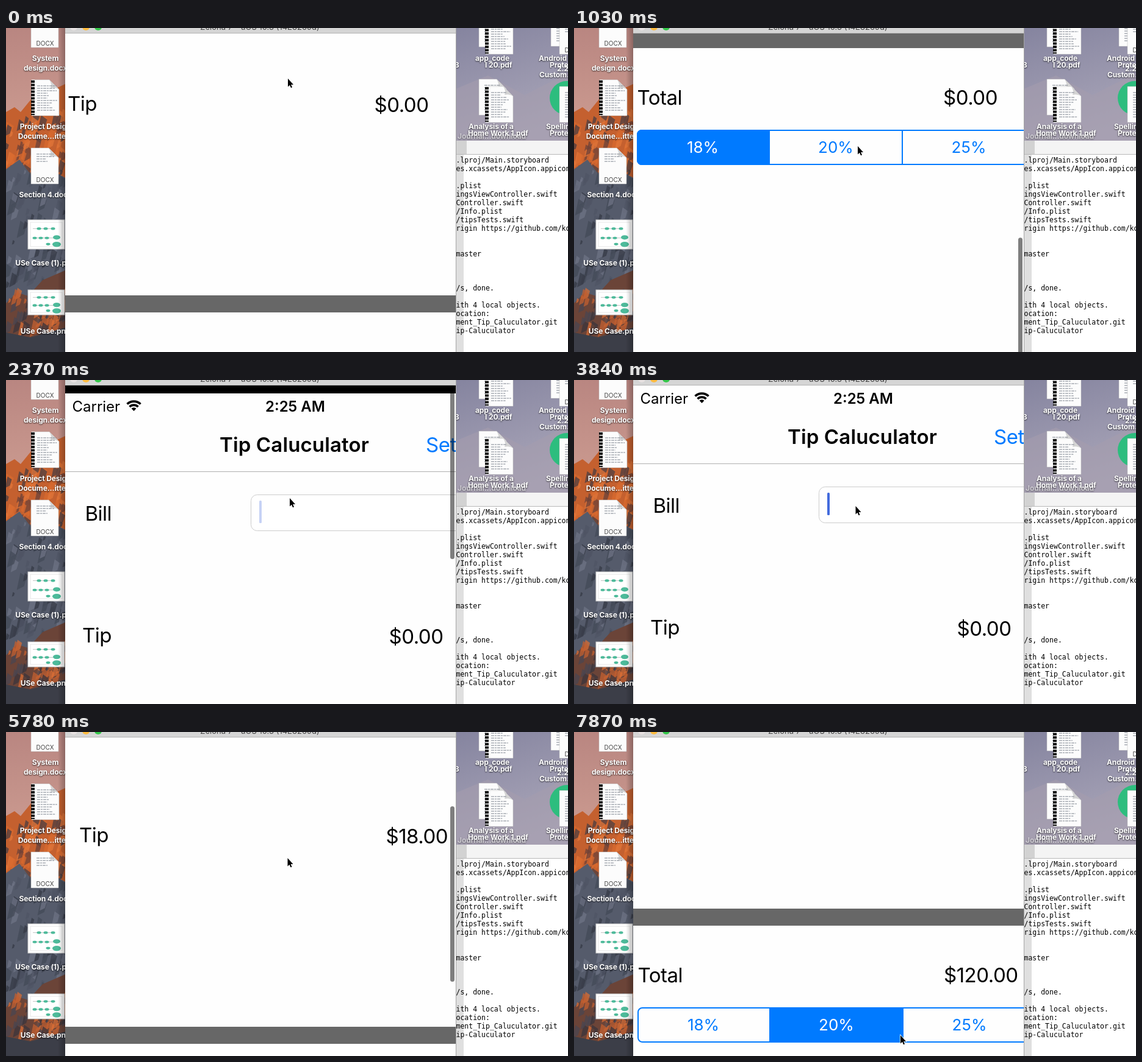
Animation of 921 by 532 pixels, one loop 8000 ms. Source, as an HTML page:

```html
<!DOCTYPE html>
<html lang="en">
<head>
<meta charset="utf-8">
<title>Tip calculator demo</title>
<style>
html, body { margin: 0; width: 100%; height: 100%; overflow: hidden; }
svg { display: block; width: 921px; height: 532px; }
text { font-family: Inter, "Open Sans", sans-serif; white-space: pre; }
.big { font-size: 33px; letter-spacing: -.015em; }
.semi { font-weight: 600; }
.mid { text-anchor: middle; }
.title { letter-spacing: .004em; }
.status { font-size: 24px; }
.field, .seg { font-size: 26px; }
.label { font-size: 12px; font-weight: 700; letter-spacing: -.01em; fill: #fff; }
.labels { filter: drop-shadow(0 1px 1px rgba(0, 0, 0, .75)); }
.term { font: 11.5px "DejaVu Sans Mono", monospace; }
</style>
</head>
<body>
<svg viewBox="0 0 921 532">
  <defs>
    <linearGradient id="sky" x2="0" y2="1">
      <stop stop-color="#b98681"/><stop offset="1" stop-color="#cf9f93"/>
    </linearGradient>
    <linearGradient id="dusk" x2=".3" y2="1">
      <stop stop-color="#85849f"/><stop offset="1" stop-color="#aaa6b9"/>
    </linearGradient>
    <linearGradient id="shade">
      <stop stop-opacity="0"/><stop offset="1" stop-opacity=".25"/>
    </linearGradient>
    <clipPath id="left"><path d="M0 0H97V532H0z"/></clipPath>
    <clipPath id="screen"><path d="M97 9H737V532H97z"/></clipPath>
    <clipPath id="pill"><rect x="129" y="883" width="654" height="58" rx="8"/></clipPath>
  </defs>
  <g id="desktop"></g>
  <g id="terminal"></g>
  <g id="window">
    <path d="M97 0H737V9H97z" fill="#d5d5d5"/>
    <path d="M97 8.5H737" stroke="#b5b5b5"/>
    <circle cx="111" cy="-2" r="6" fill="#e8e2e2"/>
    <circle cx="131" cy="-2" r="6" fill="#fdbc40"/>
    <circle cx="151" cy="-2" r="6" fill="#34c84a"/>
    <text class="mid" x="416" y="3" font-size="13" fill="#444">Zelona 7 – uOS 10.3 (14E8269d)</text>
    <g clip-path="url(#screen)">
      <path d="M97 9H737V532H97z"/>
      <g id="page">
        <path d="M0 9H900V1400H0z" fill="#fefefe"/>
        <text class="status" x="108.5" y="38.5">Carrier</text>
        <g fill="none" stroke="#000" stroke-width="3.6">
          <path d="M198.5 26.5a16 16 0 0 1 22 0M202.5 31a10 10 0 0 1 14 0"/>
          <path d="M209.5 38l-4-4.3a6 6 0 0 1 8 0z" fill="#000" stroke="none"/>
        </g>
        <text class="status semi mid" x="474" y="38.5">2:25 AM</text>
        <text class="big semi mid title" x="472.5" y="105">Tip Caluculator</text>
        <text class="big" x="688" y="105" fill="#007aff">Settings</text>
        <path d="M0 137.5H900" stroke="#b0b0b0"/>
        <text class="big" x="129.5" y="218">Bill</text>
        <rect x="401.5" y="175.5" width="400" height="59" rx="10" fill="#fff" stroke="#ccc"/>
        <text class="field" id="bill" x="414" y="213"></text>
        <rect id="caret" y="185" width="4" height="37" rx="1.5" fill="#426bdd"/>
        <text class="big" x="125" y="418">Tip</text>
        <text class="big" id="tip" x="627.5" y="420"></text>
        <path d="M0 721H900V749H0z" fill="#676767"/>
        <text class="big" x="129.5" y="842">Total</text>
        <text class="big" id="total" x="631" y="842"></text>
        <rect id="pick" y="883" width="219" height="58" fill="#007aff" clip-path="url(#pill)"/>
        <g fill="none" stroke="#007aff" stroke-width="2">
          <rect x="130" y="884" width="652" height="56" rx="7"/>
          <path d="M346 884V940M564 884V940"/>
        </g>
        <text class="seg mid" x="237" y="921">18%</text>
        <text class="seg mid" x="455" y="921">20%</text>
        <text class="seg mid" x="673" y="921">25%</text>
      </g>
      <rect id="bar" x="728" width="7" rx="3.5" fill-opacity=".5"/>
    </g>
  </g>
  <path id="cursor" d="M.5 .5V14L3.500 11.200 5.500 15.800 7.500 15 5.600 10.400H9.500z"
        stroke="#fff" stroke-width="1.6" paint-order="stroke"/>
</svg>
<script>
const $ = id => document.getElementById(id);
let seed = 7;
const rnd = () => (seed = seed * 16807 % 2147483647) / 2147483647;
const shape = (d, fill, more = '') => `<path d="${d}" fill="${fill}" ${more}/>`;
const label = (s, x, y, more = 'text-anchor="middle"') =>
  `<text class="label" x="${x}" y="${y + 4}" ${more}>${s}</text>`;

// Small angular facets that give the rock its texture
function facets(n, top, height, colors) {
  let out = '';
  for (let i = 0; i < n; i++) {
    const x = rnd() * 97, y = top + rnd() * height, r = 4 + rnd() * 11;
    out += shape(`M${x} ${y}l${r * .7} ${r * .5} ${-r * .3} ${r}l${-r * .8} ${r * .4}z`,
      colors[i % colors.length], 'opacity=".75"');
  }
  return out;
}

function rocks() {
  return '<g clip-path="url(#left)">' +
    shape('M0 0H97V200H0z', 'url(#sky)') +
    shape('M0 138L14 130 24 138 42 116 60 126 80 100 97 92V300H0z', '#c4602f') +
    facets(70, 130, 95, ['#e2753a', '#6d4238', '#d8692f', '#4c3d42']) +
    shape('M0 232L22 216 40 240 62 226 97 246V532H0z', '#555b6b') +
    facets(80, 232, 185, ['#434957', '#6d7384', '#4f5464', '#363a45']) +
    shape('M0 452L18 434 36 440 60 414 97 398V532H0z', '#6b4438') +
    facets(60, 425, 65, ['#d56c35', '#3b343b', '#c25f30', '#4a4650']) +
    shape('M0 500L40 508 97 492V532H0z', '#3c3e48') + '</g>';
}

function doc(x, y, kind) {
  const w = 45, h = 59;
  let out = shape(`M${x} ${y}h${w - 16}l16 16v${h - 16}h${-w}z`, '#fcfcfc', 'stroke="#bbb" stroke-width=".5"');
  out += shape(`M${x + w - 16} ${y}q5 8 2 14 8-2 14 2z`, '#d4d4d4');
  if (kind === 'docx')
    out += `<text x="${x + 23}" y="${y + 56}" class="mid" font-size="10" fill="#444">DOCX</text>`;
  for (let r = 0; r < (kind === 'docx' ? 4 : 11); r++)
    out += `<path d="M${x + 9} ${y + 10 + r * 4}h${16 + rnd() * 17}" stroke="#7d838e" stroke-width="1" stroke-dasharray="5 1 3 1"/>`;
  if (kind === 'bound')
    out += `<path d="M${x + 2} ${y + 1}v${h - 2}" stroke="#111" stroke-width="6" stroke-dasharray="4 1.5"/>`;
  return out;
}

function diagram(y, h) {
  let out = `<rect x="36" y="${y}" width="60" height="${h}" fill="#fff" stroke="#ccc"/>` +
    `<rect x="40" y="${y + 4}" width="52" height="${h - 8}" fill="none" stroke="#ddd" stroke-width=".7"/>`;
  const dot = (x, dy, rx = 3.5) =>
    `<ellipse cx="${x}" cy="${y + dy}" rx="${rx}" ry="${rx * .6}" fill="#4dba9a"/>`;
  out += `<path d="M44 ${y + h * .3}H80M46 ${y + h * .62}H84" stroke="#999" stroke-width=".6"/>`;
  for (const x of [54, 65, 77]) out += dot(x, h * .3);
  for (const x of [47, 57, 67]) out += dot(x, h * .62);
  return out + dot(83, h * .6, 6) + dot(69, h * .83) + dot(83, h * .84, 7);
}

$('desktop').innerHTML = rocks() +
  shape('M737 0H921V190H737z', 'url(#dusk)') +
  shape('M737 100L790 78 850 110 921 74V190H737z', '#a59dae', 'opacity=".6"') +
  doc(41, -27, 'docx') + doc(42, 85, 'bound') + doc(41, 197, 'docx') +
  diagram(315, 48) + diagram(430, 41) +
  doc(775, -28) + doc(786, -16, 'bound') + doc(775, 84) + doc(786, 96, 'bound') +
  doc(893, -29) + doc(907, -16, 'docx') +
  '<circle cx="919" cy="115" r="28" fill="#2dbd7e"/>' + doc(907, 96) +
  '<g class="labels">' +
  [['System', 50], ['design.docx', 66], ['Project Design', 162], ['Docume...itted.', 178],
   ['Section 4.docx', 274], ['USe Case (1).png', 386], ['USe Case.png', 498]]
    .map(([s, y]) => label(s, 64.5, y)).join('') +
  label('Journal...download', 740, 178, 'opacity=".6"') +
  [['3', 735, 61], ['app_code', 769, 50], ['I 20.pdf', 785, 61],
   ['Analysis of a', 758, 162], ['Home Work 1.pdf', 757, 173],
   ['Android', 873, 50], ['Protect', 891, 61], ['2.2', 903, 67], ['Custom.pdf', 874, 77],
   ['Spelling', 885, 162], ['Protect', 891, 173]]
    .map(([s, x, y]) => label(s, x, y, '')).join('') + '</g>' +
  shape('M85 0H97V532H85z', 'url(#shade)');

const lines = [[217, '.lproj/Main.storyboard'], [231, 'es.xcassets/AppIcon.appiconset'],
  [259, '.plist'], [273, 'ingsViewController.swift'], [287, 'Controller.swift'],
  [301, '/Info.plist'], [315, '/tipsTests.swift'], [329, 'rigin https://github.com/kovale'],
  [371, 'master'], [427, '/s, done.'], [455, 'ith 4 local objects.'], [469, 'ocation:'],
  [483, 'ment_Tip_Caluculator.git'], [497, 'ip-Caluculator']];
$('terminal').innerHTML =
  shape('M737 185H921V532H737z', '#fff') + shape('M737 185H921V207H737z', '#f4f4f4') +
  shape('M737 185H755V207H737z', '#d2d2d2') + shape('M737 207H921V208H737z', '#b9b9b9') +
  shape('M737 208H750V532H737z', '#dfdfdf') + shape('M737 0H738V532H737z', '#a5a5a5') +
  lines.map(([y, s]) => `<text class="term" x="737.5" y="${y + 4}">${s}</text>`).join('');

const STEP = 148.5;
function at(runs, t) {
  const [start, ...values] = runs.filter(r => r[0] <= t).pop();
  return values[Math.min(values.length - 1, Math.floor((t - start) / STEP + .08))];
}
const scroll = [
  [0, [-24, -282]],
  [440, [-24, -345], [-25, -480], [-26, -620], [-26, -722], [-26, -716], [-26, -715], [-26, -714]],
  [1630, [-25, -660], [-20, -500], [-12, -310], [-4, -120], [0, 28], [0, 13], [0, 6], [0, 2], [0, 0]],
  [5480, [0, -45], [-2, -140], [-5, -237], [-12, -318], [-18, -375], [-23, -408], [-25, -425], [-25, -431]]];
const pointer = [
  [0, [461.5, 82.5]], [140, [464.5, 193.5]], [2810, [461, 206.5]],
  [6080, [456, 222], [447, 250], [438, 274], [435, 283]],
  [6670, [414.5, 445.5]], [6970, [410.5, 446]],
  [7420, [412, 455], [430, 478], [488, 492], [534.5, 497.5]]];
const caretAlpha = [[0, 1], [2370, .3, 0], [2810, 1], [3400, .3, 0], [3840, 1], [4890, .3, 0], [5480, 1]];
const barAlpha = [[0, 0], [440, 1], [3400, .5, 0], [5480, 1], [6970, .5, 0]];

const set = (id, attrs) => {
  for (const k in attrs) $(id).setAttribute(k, attrs[k]);
};
const money = n => '$' + n.toFixed(2);
const segs = document.querySelectorAll('.seg');

function draw(now) {
  const t = now % 8000;
  const [x, y] = at(scroll, t);
  const bill = t < 4440 ? 0 : 100;
  const choice = t < 7570 ? 0 : 1;
  const tip = bill * [.18, .2][choice];

  set('page', { transform: `translate(${x} ${y})` });
  set('cursor', { transform: `translate(${at(pointer, t)})` });
  set('caret', { x: bill ? 460 : 415, opacity: at(caretAlpha, t) });
  set('bar', {
    y: 12 - .464 * Math.min(y, 0),
    height: 288 - .464 * Math.max(y, 0),
    opacity: at(barAlpha, t)
  });
  set('pick', { x: choice ? 345 : 128 });
  $('bill').textContent = bill || '';
  $('tip').textContent = money(tip);
  $('total').textContent = money(bill + tip);
  segs.forEach((s, i) => s.setAttribute('fill', i === choice ? '#fff' : '#007aff'));
  requestAnimationFrame(draw);
}
requestAnimationFrame(draw);
</script>
</body>
</html>
```
